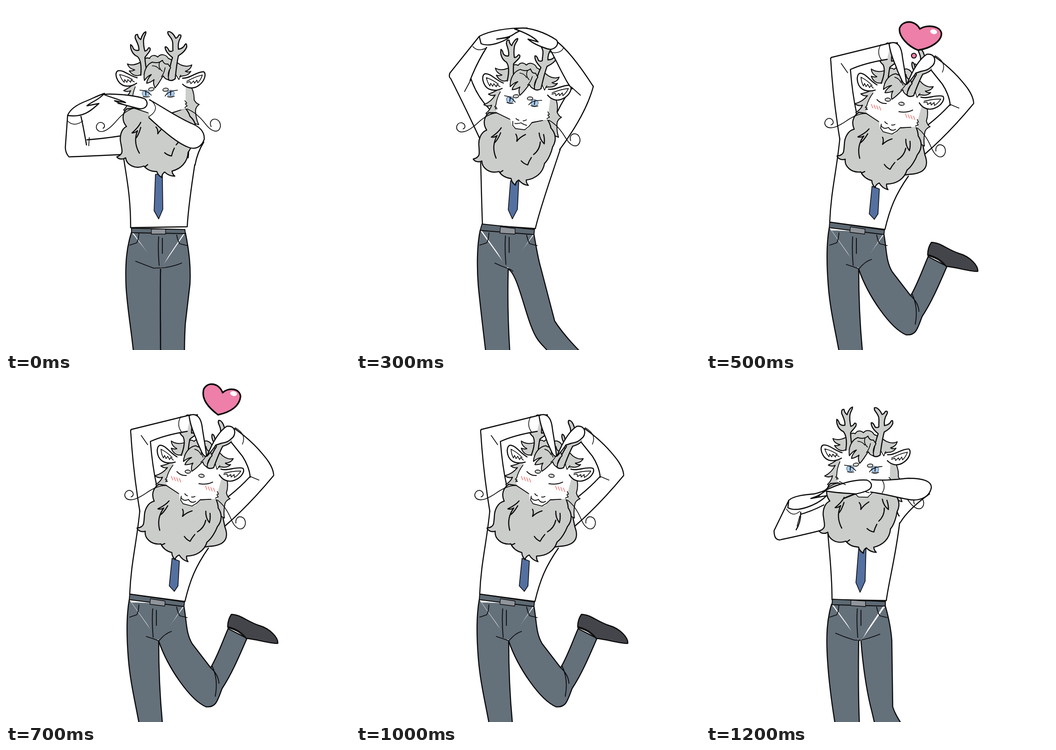
An HTML page that plays this animation: 748 px wide and 748 px high, repeating every 1300 ms.

```html
<!DOCTYPE html>
<html>
<head>
<meta charset="utf-8">
<style>
html, body { margin: 0; width: 100%; height: 100%; overflow: hidden; background: #fff }
svg { display: block; width: 100vw; height: 100vh }
</style>
</head>
<body>
<svg id="stage" viewBox="0 0 748 748" stroke-linecap="round" stroke-linejoin="round"></svg>
<script>
const INK = '#0a0a0a', HAIR = '#cbcdcb', PANTS = '#64707a';

const path = (d, fill = 'none', width = 2.4, stroke = INK) =>
  `<path d="${d}" fill="${fill}" stroke="${stroke}" stroke-width="${width}"/>`;

// A limb is an inner and an outer edge; only the edges are inked, the ends stay open.
const limb = ([inner, outer]) =>
  path(`M${inner}L${outer}`, '#fff', 0) + path(`M${inner}M${outer}`);

// Blend two poses number by number.
function mix(a, b, k) {
  if (typeof a === 'string') {
    const to = b.match(/-?[\d.]+/g);
    let i = 0;
    return a.replace(/-?[\d.]+/g, n => +(n * (1 - k) + to[i++] * k).toFixed(2));
  }
  if (Array.isArray(a)) return a.map((v, i) => mix(v, b[i], k));
  return Object.fromEntries(Object.keys(a).map(key => [key, mix(a[key], b[key], k)]));
}

const standing = {
  head: 'translate(0 0)rotate(0)',
  torso: 'M254 318C262 375 271 410 271 482L394 480C397 430 405 380 412 335',
  tie: 'M325 366L340 366L341 442L332 463L322 445Z',
  belt: 'M273 483L389 486L390 495L273 493Z',
  buckle: 'M316 485L347 485L347 496L316 496Z',
  legL: 'M273 492C262 525 259 560 261 610C264 660 272 700 278 760L336 760C336 700 335 640 336 572',
  legR: 'M390 493C398 530 402 570 400 605L390 690C388 720 388 740 388 760L388 800L336 800C336 780 336 760 336 740C336 720 336 700 336 690C335 650 335 610 336 572',
  fold: 'M282 555Q302 563 321 570L345 569Q365 566 382 559',
  fly: 'translate(0 0)',
  shoe: 'translate(27 285)'
};

const low = {
  ...standing,
  lu: ['176 291Q215 288 252 282', '250 323Q190 326 137 328'],
  lf: ['163 240Q168 262 175 302', '137 328Q129 320 129 307L134 238'],
  ru: ['396 305Q398 318 396 330', '411 346Q416 318 430 296'],
  rf: ['312 204C335 216 375 244 405 256C424 264 432 276 431 290', '431 290C424 310 408 312 396 307C372 298 340 270 311 243'],
  lh: 'M134 238C140 222 160 212 176 206C190 200 202 194 214 190C200 206 186 208 176 217L202 212C190 222 172 244 134 238Z',
  rh: 'M212 192C235 190 282 194 302 202C314 214 302 228 284 222C265 217 250 214 236 206L260 210C245 202 230 200 212 192Z',
  cuff: 'M134 250Q148 264 167 250M314 204Q338 224 310 241',
  crease: 'M181 286L180 304M243 212L262 216'
};

const high = {
  ...standing,
  lu: ['204 180Q228 208 256 228', '250 292Q205 240 162 176'],
  lf: ['193 80Q196 130 206 182', '162 178Q161 172 161 165L163 70'],
  ru: ['412 168Q408 190 410 205', '413 345Q424 280 455 152'],
  rf: ['355 46C375 62 390 76 405 92C425 112 442 132 455 150', '412 168C402 165 394 158 388 150C376 128 362 105 348 88'],
  lh: 'M163 72C163 52 170 44 195 43C215 42 235 40 255 40C240 46 220 46 205 50L242 50C225 62 190 64 165 68Z',
  rh: 'M252 40C285 32 330 34 350 44C360 56 348 70 336 69C320 66 305 62 290 54L310 56C290 48 270 46 252 40Z',
  cuff: 'M163 80Q180 94 193 82M354 46Q376 64 350 82',
  crease: 'M206 168L190 200M210 176L202 188'
};

const rising = {
  ...mix(low, high, .5),
  lu: ['172 240Q215 250 252 255', '250 305Q170 290 100 262'],
  lf: ['178 162Q170 200 172 240', '100 262Q96 250 98 238L148 160']
};

const lean = {
  head: 'translate(57 -23)rotate(7.2)',
  torso: 'M269 290C272 340 272 400 275 476L390 484C400 440 425 370 444 312',
  tie: 'M336 380L354 380L351 442L340 463L331 443Z',
  belt: 'M274 474L388 486L387 497L270 488Z',
  buckle: 'M314 480L346 484L346 496L313 494Z',
  legL: 'M270 488C264 515 262 560 266 610C271 660 276 700 283 760L335 760C331 700 329 640 331 572',
  legR: 'M387 497C393 530 396 550 402 570L432 685C445 705 470 740 560 820L500 860C470 830 450 785 415 748C408 740 402 735 395 725C370 690 355 585 331 572',
  fold: 'M302 559Q316 566 331 571L336 573Q339 574 341 577',
  fly: 'translate(-7 -2)',
  shoe: 'translate(27 285)',
  lu: ['250 158Q262 195 290 224', '268 286Q235 215 203 152'],
  lf: ['284 90Q262 125 248 162', '204 156Q202 152 204 146L268 66'],
  ru: ['470 178Q452 200 438 230', '443 312Q500 235 516 175'],
  rf: ['438 78C455 92 470 110 482 126C495 143 505 158 516 175', '470 180C466 176 458 164 452 152C444 138 435 118 424 98'],
  lh: 'M268 66C290 54 330 47 372 48C360 52 350 56 342 62C334 68 320 70 306 72L334 68C320 78 290 90 272 82Z',
  rh: 'M345 50C375 42 415 60 436 74C444 84 430 98 416 93C400 88 385 82 374 72L396 78C385 66 368 58 345 50Z',
  cuff: 'M254 88Q264 100 282 92M452 90Q444 106 422 100',
  crease: 'M250 160L236 186M468 176L488 194'
};

const love = {
  head: 'translate(137 -53)rotate(15)',
  torso: 'M291 288C284 360 272 400 269 470L389 486C400 440 412 410 440 370',
  tie: 'M361 392L377 398L374 452L366 464L355 452Z',
  belt: 'M269 470L388 487L387 497L268 482Z',
  buckle: 'M314 480L346 485L345 496L313 492Z',
  legL: 'M268 482C262 515 262 560 266 610C270 660 280 700 291 760L341 760C335 700 332 640 332 572',
  legR: 'M387 497C393 530 391 555 405 578L445 630C460 605 470 575 483 545L524 566C505 610 490 645 470 675C460 700 458 717 435 715C400 700 352 630 332 572',
  fold: 'M305 562Q318 566 331 571L333 571Q346 555 360 551',
  fly: 'translate(-13 0)',
  shoe: 'translate(0 0)',
  lu: ['314 138Q318 190 328 236', '291 290Q276 200 271 114'],
  lf: ['394 116Q345 124 314 138', '271 118Q271 114 272 112L402 80'],
  ru: ['531 214Q505 242 478 262', '476 322Q530 275 582 212'],
  rf: ['497 110C520 126 535 140 548 154C560 168 580 188 582 210', '531 216C530 200 522 182 514 170C506 160 498 150 490 140'],
  lh: 'M398 82C410 76 424 80 427 110C430 130 434 150 436 170C432 172 428 166 426 162L416 140C412 125 402 112 398 82Z',
  rh: 'M437 170C445 150 460 118 480 105C500 102 502 124 490 132C482 140 476 140 468 142L456 146C450 156 444 162 437 170Z',
  cuff: 'M380 84Q370 102 382 118M498 108Q524 122 514 144',
  crease: 'M294 125L308 145M531 214L550 222'
};

const cross = {
  head: 'translate(16.5 -3.5)rotate(2)',
  torso: 'M264 325C268 380 274 420 274 482L392 484C398 440 412 390 421 315',
  tie: 'M332 370L348 370L346 442L335 466L326 445Z',
  belt: 'M275 481L390 486L390 496L274 493Z',
  buckle: 'M315 483L347 485L347 497L315 495Z',
  legL: 'M273 492C263 525 261 560 264 610C267 660 272 700 282 760L334 760C331 700 331 640 332 572',
  legR: 'M390 496C397 520 402 545 404 570L406 715C410 728 416 738 430 760L430 800L370 800C370 780 368 760 366 748C364 740 362 730 358 715C345 660 340 610 337 572',
  fold: 'M282 555Q302 564 323 570L336 570Q356 566 378 557',
  fly: 'translate(-3 0)',
  shoe: 'translate(27 285)',
  lu: ['200 298Q230 290 256 276', '256 330Q200 344 160 352'],
  lf: ['206 292Q206 315 196 330', '160 352Q148 352 148 332L180 266'],
  ru: ['412 256Q412 290 420 300', '422 315Q440 285 486 252'],
  rf: ['360 221C390 224 415 220 440 218C465 218 490 222 490 238', '490 238C486 262 460 268 440 264C415 260 390 252 358 248'],
  lh: 'M180 266C190 256 215 254 235 252C245 250 255 246 262 243C250 254 240 258 228 262L262 256C245 274 200 294 178 282Z',
  rh: 'M258 245C285 232 320 220 350 222C364 228 362 240 350 245C335 252 315 252 300 262L325 252C300 250 280 250 258 245Z',
  cuff: 'M175 285Q188 304 204 290M383 222Q392 236 383 250',
  crease: 'M204 300L198 322M290 225L303 232'
};

const poses = [low, rising, high, lean, mix(lean, love, .5),
  love, love, love, love, love, love, mix(love, cross, .5), cross];

const headBack =
  path('M291 150C284 154 274 150 268 141Q276 142 280 139Q267 136 264 126Q276 131 291 123L300 116Q306 111 312 114C316 106 324 106 330 111C336 103 348 105 353 114Q364 118 380 128Q394 134 404 128Q402 138 390 142Q397 145 402 142Q396 152 384 152L340 165Z', HAIR, 2) +
  path('M277 170Q268 178 256 184Q264 188 271 184Q264 200 249 208Q258 212 266 207Q264 218 256 226L270 240L290 222L286 175M398 168Q410 185 409 204Q414 213 420 214Q412 220 412 228Q413 245 419 258Q406 256 398 244L386 222L386 170', HAIR, 2) +
  path('M262 224C252 235 252 250 262 262C250 268 246 285 250 300C252 312 254 318 250 322Q247 326 241 328C245 334 254 334 260 330C262 345 280 356 300 348C308 358 318 360 328 360Q330 368 339 373Q338 366 345 361Q354 370 367 370Q362 366 361 359C380 354 395 340 396 318C404 308 408 290 409 280C416 265 412 250 400 240Q398 232 390 222L356 234L310 232L279 222Z', HAIR) +
  path('M293 253Q288 264 274 276Q281 276 286 271Q276 296 290 320M282 288Q288 282 293 264M326 263Q331 268 330 278Q336 268 347 261M376 254Q379 268 390 276Q390 266 386 256M381 273Q382 290 370 302M345 319Q352 325 360 326Q362 317 366 309M303 349L308 345') +
  path('M281 176C276 190 274 210 279 222L310 232L316 246Q320 252 334 252Q348 252 352 246L357 233L394 222C388 205 392 190 390 165L360 140L300 140Z', '#fff', 0) +
  path('M279 222L308 232M316 236L317 245L324 251L344 251L352 243L358 233L380 226M275 206L273 210L277 210L275 214L279 213M389 206L393 211L390 213L394 217L389 221M281 176Q275 190 275 206M322 229Q325 232 329 232M338 232Q342 232 345 229', 'none', 1.7) +
  path('M285 156C268 152 255 138 243 141C234 146 242 168 256 173Q270 177 284 168', '#fff') +
  path('M384 157C400 158 415 142 430 143C436 148 432 163 420 172C405 184 390 176 384 170', '#fff') +
  path('M247 149Q251 160 257 166L258 160L263 166L265 160L271 166L272 161L279 165M247 149Q262 152 275 160M427 150Q424 160 417 167L415 161L410 168L408 163L402 169L400 164L393 167M427 150Q410 154 393 164', 'none', 1.6) +
  path('M279 222C262 226 250 238 240 250C228 264 214 277 202 272C192 266 197 253 206 253C214 254 217 262 211 266M394 224C410 230 425 245 435 258C446 272 458 276 464 268C470 258 463 246 454 246C446 246 442 254 446 262', 'none', 1.7);

const headFront =
  path('M293 150C295 130 292 116 286 110C276 106 270 95 271 84Q275 86 277 93C281 97 286 97 289 96C290 86 284 78 281 70Q280 61 286 62Q287 69 293 73C295 66 298 58 304 56C306 60 299 66 299 76Q299 88 302 98Q307 97 310 91Q315 90 313 97C309 104 304 108 302 112Q303 130 308 150', HAIR) +
  path('M352 160C354 145 358 125 362 112C354 106 346 98 346 89Q350 87 355 98C358 99 361 99 363 97C362 88 364 80 361 74C358 66 350 62 352 56C357 54 364 60 369 70Q373 69 376 63Q383 61 379 70Q373 80 375 94Q386 92 389 84Q393 79 393 89C389 100 380 105 375 108Q371 125 368 158Q360 165 352 160Z', HAIR) +
  path('M318 122C304 128 298 145 301 162Q308 152 316 149Q306 160 306 168Q315 166 322 160Q319 168 324 178C332 170 336 160 342 152Q346 160 354 160Q350 146 358 134L352 126Q344 128 340 118Q332 126 318 122Z', HAIR, 2) +
  path('M318 130Q328 130 334 138M334 122Q330 134 340 142M346 134Q344 146 338 154M370 150L376 160L380 150', 'none', 1.6);

const brows =
  '<g fill="#d4d7d4" stroke="#0a0a0a" stroke-width="1.6"><ellipse cx="316" cy="181" rx="6" ry="3.5" transform="rotate(-12 316 181)"/>' +
  '<ellipse cx="347" cy="182" rx="6" ry="3.5" transform="rotate(-8 347 182)"/></g>';

const iris = x => `<ellipse cx="${x}" cy="190" rx="8" ry="7" fill="#a6c9ec" stroke="#456" stroke-width="1"/>` +
  path(`M${x} 185V194`, 'none', 1.8);

const awake = iris(304) + iris(358) +
  path('M291 183Q306 183 316 194M298 197Q306 199 312 197M346 196Q352 185 373 183M351 197Q358 200 366 196', 'none', 1.6) +
  path('M321 240Q328 240 334 237Q340 240 347 241', 'none', 1.7);

const blush = (x, y) => [0, 6, 12, 18].map(i => `M${x + i} ${y}l5 7`).join('');
const happy =
  path('M293 187Q303 194 315 190M346 200Q362 199 374 189', 'none', 2) +
  path('M316 239Q324 247 333 239Q341 247 349 239', 'none', 1.8) +
  path(blush(284, 200) + blush(361, 201), 'none', 1.3, '#f0605c');

const shoe =
  path('M482 543Q508 546 524 566L517 562Q505 549 482 543Z', '#fff', 1.6) +
  path('M490 514C510 514 525 530 550 538C575 545 592 565 591 577C575 578 545 568 522 566C515 555 500 545 482 541Q482 526 490 514Z', '#44454a');

const heartBorn = 'M461 96C440 88 418 66 421 48C428 30 455 30 465 50C478 40 510 42 512 60C512 76 490 92 461 96Z';
const heartUp = 'M461 80C440 64 424 46 430 24C440 6 464 12 471 32C484 20 508 22 510 40C508 60 490 74 461 80Z';

function heart(step) {
  if (step < 5 || step > 9) return '';
  const born = step === 5;
  const alpha = [1, 1, 1, .47, .2][step - 5];
  const gleamY = born ? 56 : 34;
  return `<g opacity="${alpha}" transform="translate(0 ${step === 9 ? -5 : 0})">` +
    path(born ? heartBorn : heartUp, '#ee7fa8', 3.4) +
    `<ellipse cx="495" cy="${gleamY}" rx="7.5" ry="5" fill="#fff" transform="rotate(12 495 ${gleamY})"/>` +
    (born ? '<circle cx="452" cy="108" r="5.3" fill="#ee7fa8" stroke="#0a0a0a" stroke-width="2"/>' + path('M455 126l2 2') : '') +
    '</g>';
}

function draw(step) {
  const p = poses[step], glad = step >= 5 && step <= 10;
  return path('M273 488L388 492L334 573Z', PANTS, 0) +
    path(p.legR, PANTS) + path(p.legL, PANTS) +
    path('M280 488L380 494L340 568L326 568Z', PANTS, 0) +
    (glad ? path('M445 630Q462 645 463 664M448 626Q462 655 455 692', 'none', 1.8) : '') +
    `<g transform="${p.shoe}">${shoe}</g>` +
    path('M289 493Q288 510 284 515L269 520M371 498Q374 512 378 517L394 521', 'none', 1.7) +
    `<g transform="${p.fly}">${path('M332 502Q330 530 333 564M340 505L340 538', 'none', 1.8)}</g>` +
    path(p.fold, 'none', 1.7) +
    path(p.torso, '#fff') + path(p.tie, '#5470a0', 1.6) +
    path(p.belt, '#5d6973', 2) + path(p.buckle, '#90949b', 1.3) +
    limb(p.lu) + limb(p.ru) +
    (glad ? path('M470 295L476 324C484 345 480 364 443 366L400 372', HAIR) : '') +
    `<g transform="${p.head}">${headBack + (glad ? happy : awake) + brows + headFront}</g>` +
    limb(p.lf) + limb(p.rf) +
    path(p.cuff, 'none', 1.5) + path(p.lh, '#fff') + path(p.rh, '#fff') +
    path(p.crease, 'none', 1.7) + heart(step);
}

const stage = document.getElementById('stage');
const start = performance.now();
let shown = -1;
function tick() {
  const step = Math.floor((performance.now() - start) / 100) % 13;
  if (step !== shown) stage.innerHTML = draw(shown = step);
  requestAnimationFrame(tick);
}
tick();
</script>
</body>
</html>
```
